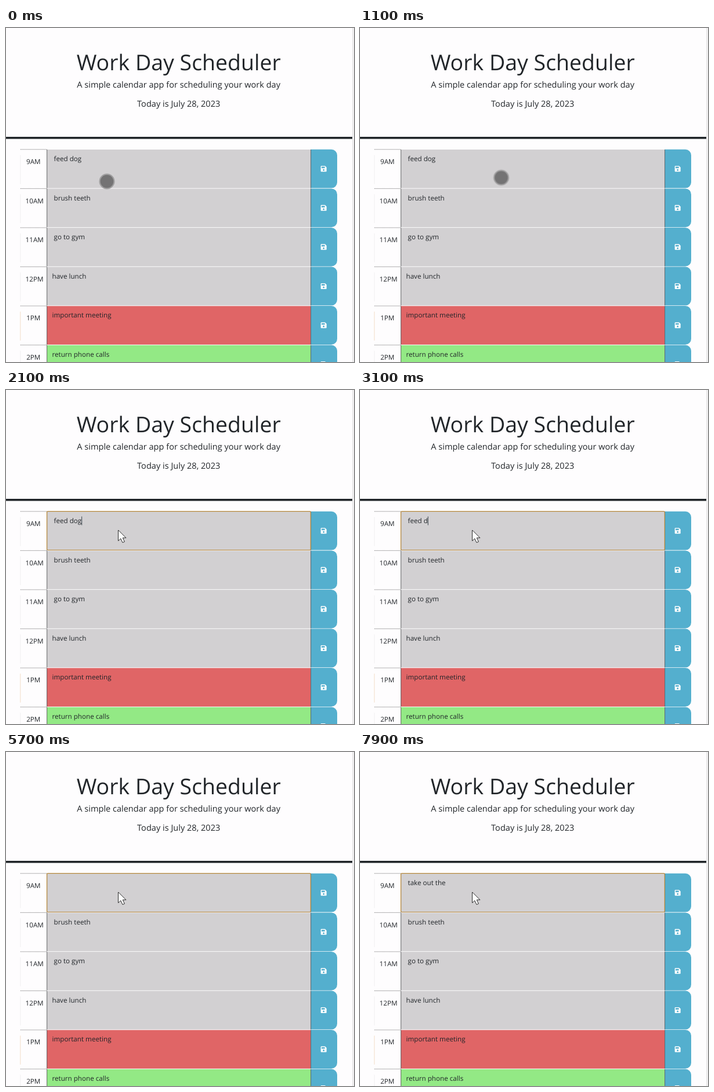
Animation, 600 px wide and 577 px high, one loop 8000 ms. Source, as an HTML page:

```html
<!DOCTYPE html>
<html lang="en">
<head>
<meta charset="utf-8">
<title>Work Day Scheduler</title>
<style>
  html, body { margin: 0; width: 100%; height: 100%; overflow: hidden; background: #fefdfe; }
  svg { display: block; width: 600px; height: 577px; }
  text {
    font-family: "Open Sans", sans-serif;
    font-size: 11.65px;
    fill: #212529;
    white-space: pre;
    text-rendering: geometricPrecision;
  }
  .head text { text-anchor: middle; font-size: 14.56px; }
  .head .title { font-size: 37.46px; }
  .past { fill: #d2d0d2; }
  .present { fill: #e06566; }
  .future { fill: #93e985; }
  .button { fill: #54afce; }

  .dot { animation: roam 8s linear infinite, before 8s step-end infinite; }
  .arrow, .focus { animation: after 8s step-end infinite; }
  @keyframes roam {
    0% { transform: translate(174px, 265px); animation-timing-function: ease-in-out; }
    8.75% { transform: translate(254px, 264px); }
    11.25% { transform: translate(254px, 262px); animation-timing-function: ease-in-out; }
    20%, 100% { transform: translate(193px, 241.5px); }
  }
  @keyframes before { 0% { opacity: 1; } 25%, 100% { opacity: 0; } }
  @keyframes after { 0% { opacity: 0; } 25%, 100% { opacity: 1; } }
</style>
</head>
<body>
<svg viewBox="0 0 600 577">
  <defs>
    <path id="save" fill="#fff" fill-rule="evenodd"
      d="M-4-5H2.4L5-2.4V4Q5 5 4 5H-4Q-5 5-5 4V-4Q-5-5-4-5ZM-3.6-3.6V-.9H2V-3.6ZM0 .6A1.5 1.5 0 0 0 0 3.6A1.5 1.5 0 0 0 0 .6Z"/>
  </defs>
  <rect x="597" width="3" height="577" fill="#f1f0f1"/>
  <rect x="597" width="1" height="577" fill="#e6e5e6"/>
  <g class="head">
    <text class="title" x="297.7" y="72.7">Work Day Scheduler</text>
    <text x="297.7" y="102.7">A simple calendar app for scheduling your work day</text>
    <text x="297.7" y="136">Today is July 28, 2023</text>
  </g>
  <rect y="188" width="597" height="3.6" fill="#212529"/>
  <g id="rows"></g>
  <rect class="focus" x="70.5" y="209.7" width="454.8" height="66.8" rx="1.5" fill="none" stroke="#b98a3c" stroke-width="1.2"/>
  <rect id="caret" y="218.5" width="0.9" height="15" fill="#27343c"/>
  <g class="dot">
    <circle r="13.5" fill="#a09fa0"/>
    <circle r="11.3" fill="#747374"/>
  </g>
  <path class="arrow" d="M193.5 242V260.6L197.8 256.7L201 263.6L204.4 262.1L201.3 255.4H206.9Z"
    fill="#fff" stroke="#2b2b2b" stroke-width="1" stroke-linejoin="round"/>
</svg>
<script>
  const LOOP = 8000, PITCH = 67.58, TOP = 209.6, FOCUS = 2000;
  const rows = [
    ["9AM", " feed dog", "past"],
    ["10AM", " brush teeth", "past"],
    ["11AM", " go to gym", "past"],
    ["12PM", "have lunch", "past"],
    ["1PM", "important meeting", "present"],
    ["2PM", "return phone calls", "future"]
  ];

  document.getElementById("rows").innerHTML = rows.map(([hour, task, state], i) => {
    const hourPlace = hour.length > 3 ? 'x="33.6"' : 'x="47.3" text-anchor="middle"';
    return `<g transform="translate(0 ${TOP + i * PITCH})">
      <path d="M24.8 10V60" stroke="${state === "present" ? "#f1dcc8" : "#efeeef"}"/>
      <path d="M24.8 .2H70" stroke="#555" stroke-width=".9" stroke-dasharray="1 1"/>
      <rect class="${state}" x="70.4" y=".4" width="455" height="66.6"/>
      <path class="button" d="M525.4 .2H561a10 10 0 0 1 10 10V57a10 10 0 0 1 -10 10H525.4Z"/>
      <path d="M70.6 .4V67M525.6 .4V67" stroke="#5c5c5e" stroke-width=".9"/>
      <use href="#save" x="547.7" y="33.6"/>
      <text ${hourPlace} y="25.4">${hour}</text>
      <text class="task" x="79.5" y="20.4">${task}</text>
    </g>`;
  }).join("");

  const field = document.querySelector(".task");
  const caret = document.getElementById("caret");

  // Each time is one keystroke: first the deletions, then the typing.
  const oldText = "feed dog", newText = "take out the ";
  const erased = [2800, 3000, 3200, 3400, 3550, 3750, 3900, 4100];
  const typed = [6000, 6100, 6200, 6350, 6480, 6590, 6700, 6850, 6950, 7050, 7180, 7290, 7380];
  const keys = [FOCUS, ...erased, ...typed];
  const passed = (times, t) => times.filter(k => k <= t).length;

  function draw(t) {
    const text = " " + oldText.slice(0, oldText.length - passed(erased, t)) + newText.slice(0, passed(typed, t));
    if (field.textContent !== text) field.textContent = text;
    const last = keys[passed(keys, t) - 1];
    const shown = t >= FOCUS && (t - last) % 1000 < 500;
    caret.style.opacity = shown ? 1 : 0;
    caret.setAttribute("x", 79.5 + field.getComputedTextLength());
  }

  let start;
  function tick(now) {
    start ??= now;
    draw((now - start) % LOOP);
    requestAnimationFrame(tick);
  }
  requestAnimationFrame(tick);
</script>
</body>
</html>
```
